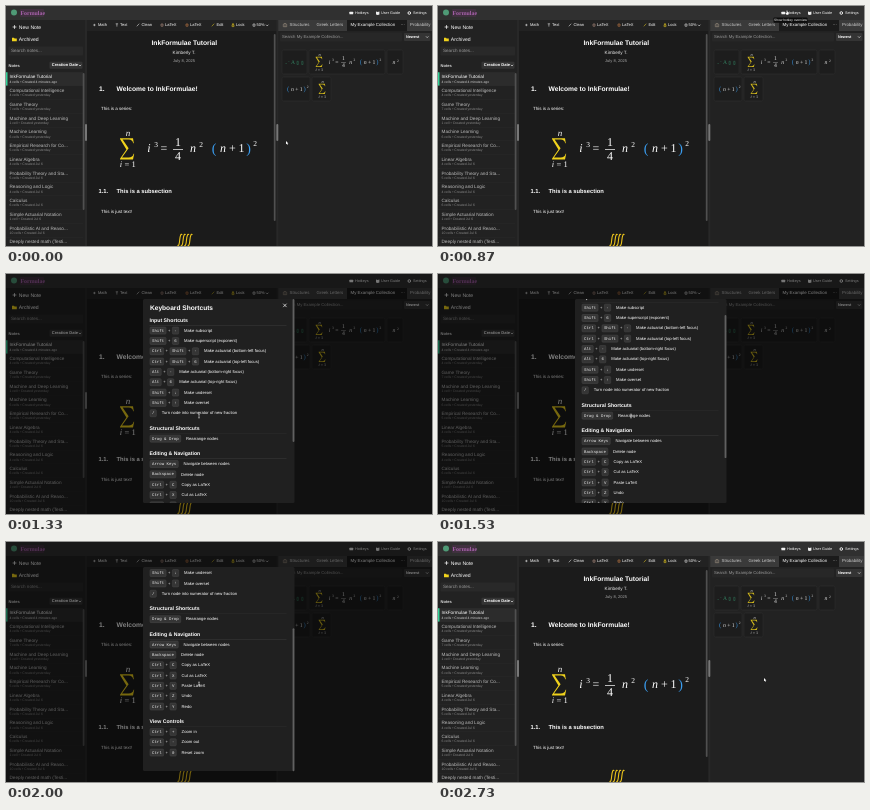
Animation, 426 px wide and 240 px high, one loop 2790 ms. Source, as an HTML page with a canvas:

```html
<!DOCTYPE html>
<html lang="en">
<head>
<meta charset="utf-8">
<title>InkFormulae</title>
<style>
html, body { margin: 0; width: 100%; height: 100%; overflow: hidden; background: #1b1b1b; }
canvas { display: block; width: 100vw; height: 100vh; }
</style>
</head>
<body>
<canvas id="stage"></canvas>
<script>
const W = 426, H = 240, LOOP = 2790;
const OPEN = 1000, CLOSE = 2520, MAX_SCROLL = 87.5;
const SANS = '"Liberation Sans", Arial, sans-serif';
const SERIF = '"Liberation Serif", serif';
const MONO = '"Liberation Mono", monospace';
const YELLOW = '#f0d21c', BLUE = '#3a9df0', GREEN = '#34d399';

const canvas = document.getElementById('stage');
const ctx = canvas.getContext('2d');
const ratio = window.devicePixelRatio || 1;
canvas.width = W * ratio;
canvas.height = H * ratio;

function rect(x, y, w, h, color, radius = 0) {
  ctx.fillStyle = color;
  ctx.beginPath();
  ctx.roundRect(x, y, w, h, radius);
  ctx.fill();
}

function frame(x, y, w, h, color, radius = 1) {
  ctx.strokeStyle = color;
  ctx.lineWidth = 0.5;
  ctx.beginPath();
  ctx.roundRect(x, y, w, h, radius);
  ctx.stroke();
}

function text(str, x, y, size, color = '#fff', { style = '', font = SANS, align = 'left' } = {}) {
  ctx.font = `${style} ${size}px ${font}`;
  ctx.textAlign = align;
  ctx.textBaseline = 'middle';
  ctx.fillStyle = color;
  ctx.fillText(str, x, y);
}

const bold = (str, x, y, size, color, align) => text(str, x, y, size, color, { style: 'bold', align });

function stroke(path, color, width = 0.6) {
  ctx.strokeStyle = color;
  ctx.lineWidth = width;
  ctx.stroke(new Path2D(path));
}

function fill(path, color) {
  ctx.fillStyle = color;
  ctx.fill(new Path2D(path));
}

function at(x, y, scale, draw) {
  ctx.save();
  ctx.translate(x, y);
  ctx.scale(scale, scale);
  draw();
  ctx.restore();
}

// Mathematics, laid out around the centre of the sum sign
const glyph = (str, x, y, size = 12, color = '#fff') =>
  text(str, x, y, size, color, { font: SERIF, align: 'center', style: /[a-z]/.test(str) ? 'italic' : '' });

function sum() {
  fill('M-7-10.8H6L6.8-5.8H6.2Q5.4-9.5 1.8-9.5H-4.4L1.6-.8L-5 8.6H1.6Q5.8 8.6 6.6 4.8H7.2L6 10.5H-7V9.8L-.6 .6L-7-10Z', YELLOW);
  glyph('n', 1, -15.6, 9);
  glyph('i', -6, 16, 8.5);
  glyph('=', 0, 16, 8.5);
  glyph('1', 6.5, 16, 8.5);
}

function square() {
  glyph('(', 0, 0, 14, BLUE);
  glyph('n', 9, 0);
  glyph('+', 18.5, 0);
  glyph('1', 27.5, 0);
  glyph(')', 34.5, 0, 14, BLUE);
  glyph('2', 41, -4.5, 7.5);
}

function nSquared() {
  glyph('n', 0, 0);
  glyph('2', 8, -4, 7.5);
}

function formula() {
  sum();
  glyph('i', 22, 0);
  glyph('3', 29, -4, 7.5);
  glyph('=', 37, 0);
  glyph('1', 51, -6.6);
  rect(46, 0.2, 10, 0.7, '#fff');
  glyph('4', 51, 7.6);
  at(66, 0, 1, nSquared);
  at(87, 0, 1, square);
}

function header() {
  rect(0, 0, W, 14, '#303030');
  ctx.fillStyle = '#4f9a76';
  ctx.beginPath();
  ctx.arc(8, 6.5, 3, 0, 7);
  ctx.fill();
  rect(14, 3, 24, 8, '#40303f', 1);
  text('Formulae', 14.5, 7, 5.9, '#a862ac', { font: SERIF, style: 'bold' });
  rect(343.4, 5.8, 3.8, 2.5, '#eee', 0.5);
  text('Hotkeys', 349, 7, 3.75);
  fill('M370 5.4L371.7 5.9L373.4 5.4V8.4L371.7 8.9L370 8.4Z', '#eee');
  text('User Guide', 375, 7, 3.75);
  ctx.strokeStyle = '#eee';
  ctx.lineWidth = 1;
  ctx.beginPath();
  ctx.arc(403.3, 7, 1.3, 0, 7);
  ctx.stroke();
  text('Settings', 407, 7, 3.75);
}

const notes = [
  ['InkFormulae Tutorial', '4 cells • Created 4 minutes ago'],
  ['Computational Intelligence', '4 cells • Created yesterday'],
  ['Game Theory', '7 cells • Created yesterday'],
  ['Machine and Deep Learning', '1 cell • Created yesterday'],
  ['Machine Learning', '6 cells • Created yesterday'],
  ['Empirical Research for Co...', '5 cells • Created yesterday'],
  ['Linear Algebra', '4 cells • Created Jul 6'],
  ['Probability Theory and Sta...', '5 cells • Created Jul 6'],
  ['Reasoning and Logic', '4 cells • Created Jul 6'],
  ['Calculus', '6 cells • Created Jul 6'],
  ['Simple Actuarial Notation', '1 cell • Created Jul 6'],
  ['Probabilistic AI and Reaso...', '10 cells • Created Jul 6'],
  ['Deeply nested math (Testi...', '']
];

function sidebar() {
  rect(0, 14, 80, 226, '#222');
  stroke('M6.6 21H10.4M8.5 19.1V22.9', '#fff', 0.7);
  text('New Note', 12.8, 21.2, 5.1);
  fill('M6 31.8H8L8.6 32.4H10.8V35.3H6Z', YELLOW);
  text('Archived', 12.8, 33.6, 5.1);
  rect(2.5, 40.5, 74.5, 9, '#292929', 1);
  text('Search notes...', 5, 45.2, 4.6, '#999');
  bold('Notes', 2.5, 59.5, 4.06, '#ddd');
  rect(43.5, 55.8, 33, 7, '#343434', 1);
  bold('Creation Date', 45.8, 59.3, 4.06);
  stroke('M72.8 58.8L74 60L75.2 58.8', '#fff');
  rect(0, 66.3, 77, 13.4, '#2c2c2c');
  rect(0, 66.3, 1.5, 13.4, GREEN);
  notes.forEach(([name, info], i) => {
    const y = 71.2 + i * 13.75;
    text(name, 3.5, y, 4.68, i ? '#bdbdbd' : '#fff');
    text(info, 3.5, y + 4.5, 3.45, i ? '#888' : '#ccc');
    rect(0, y + 8.6, 77, 0.3, '#2c2c2c');
  });
  rect(76.7, 67, 1.8, 137, '#505050', 0.9);
}

function splitter(x) {
  rect(x, 14, 2, 226, '#282828');
  rect(x, 118, 2, 17, '#777', 1);
}

const tools = [
  ['Math', 92, 'M87.2 19H89.6M88.4 17.8V20.2'], ['Text', 114, 'M109.7 17.8H112.1M110.9 17.8V20.6'],
  ['Clean', 135.5, 'M130.8 20.3L133.2 17.7'], ['LaTeX', 159, 'M155 18H157V20.2H155Z', '#c8a090'],
  ['LaTeX', 184, 'M180 18H182V20.2H180Z', '#e08a4b'], ['Edit', 210.5, 'M205.8 20.3L208.2 17.7', YELLOW],
  ['Lock', 230, 'M226 19H228V20.6H226ZM226.4 19V17.7H227.6V19', YELLOW], ['50%', 250.5, 'M247 18H249V20.2H247Z']
];

function editor() {
  rect(81, 14, 190, 226, '#1b1b1b');
  rect(81, 14, 190, 11, '#222');
  for (const [label, x, icon, color = '#fff'] of tools) {
    stroke(icon, color, 0.5);
    text(label, x, 19.2, 4.06);
  }
  stroke('M260 18.7L261.2 19.9L262.4 18.7', '#fff');
  bold('InkFormulae Tutorial', 178.3, 37.3, 6.7, '#fff', 'center');
  text('Kimberly T.', 178, 47, 4.65, '#eee', { align: 'center' });
  text('July 8, 2025', 178, 54.5, 4.06, '#aaa', { align: 'center' });
  bold('1.', 93, 82.7, 6.7);
  bold('Welcome to InkFormulae!', 110.5, 82.7, 6.7);
  text('This is a series:', 95, 103.2, 4.5);
  at(121, 143, 1, formula);
  bold('1.1.', 92.5, 185, 5.8);
  bold('This is a subsection', 110.5, 185, 5.8);
  text('This is just text!', 95, 205.5, 4.5);
  for (let i = 0; i < 4; i++) {
    const x = 171.5 + i * 3.4;
    stroke(`M${x} 239Q${x + 1.6} 241 ${x + 2.2} 234T${x + 4.8} 228.7`, '#ecc41c', 1.1);
  }
  rect(267.8, 28, 1.8, 187, '#505050', 0.9);
}

function collection() {
  rect(272, 14, 154, 226, '#222');
  rect(272, 14, 154, 11, '#3a3a3a');
  rect(341, 14, 60, 11, '#1b1b1b');
  stroke('M277.3 20.7V18.2L279 17.3L280.7 18.2V20.7ZM279 17.3V20.7', '#a99a88', 0.5);
  text('Structures', 283.5, 19, 4.4, '#ccc');
  text('Greek Letters', 310.5, 18.8, 4.4, '#ccc');
  text('My Example Collection', 344.5, 19, 4.4);
  text('⋯', 394.5, 19, 4.4, '#bbb');
  text('Probability', 404, 18.8, 4.4, '#ccc');
  rect(274, 26.5, 122, 9, '#272727', 1);
  text('Search My Example Collection...', 276, 31, 4.26, '#999');
  rect(398, 27, 26.5, 8, '#343434', 1);
  bold('Newest', 400, 31, 3.8);
  stroke('M420 30.4L421.2 31.6L422.4 30.4', '#fff');
  for (const [x, y, w] of [[276, 44, 25], [303, 44, 76], [381, 44, 16], [276, 71, 28], [306, 71, 19]]) {
    rect(x, y, w, 24, '#1d1d1d', 1.5);
    frame(x, y, w, 24, '#303030', 1.5);
  }
  ctx.globalAlpha = 0.85;
  stroke('M279.5 57.5H280.8M282.5 55.5H283.3M291 55.3H292.3V58.5H291ZM295.7 55.3H297V58.5H295.7Z', '#3a9a72', 0.4);
  glyph('A', 287, 56.5, 5.5, '#3a9a72');
  at(313, 56, 0.48, formula);
  at(388, 56.5, 0.48, nSquared);
  at(282, 83, 0.48, square);
  at(316, 83, 0.48, sum);
  ctx.globalAlpha = 1;
}

const sections = [
  ['Input Shortcuts', [
    ['Shift|-', 'Make subscript'], ['Shift|6', 'Make superscript (exponent)'],
    ['Ctrl|Shift|-', 'Make actuarial (bottom-left focus)'], ['Ctrl|Shift|6', 'Make actuarial (top-left focus)'],
    ['Alt|-', 'Make actuarial (bottom-right focus)'], ['Alt|6', 'Make actuarial (top-right focus)'],
    ['Shift|↓', 'Make underset'], ['Shift|↑', 'Make overset'],
    ['/', 'Turn node into numerator of new fraction']]],
  ['Structural Shortcuts', [['Drag & Drop', 'Rearrange nodes']]],
  ['Editing & Navigation', [
    ['Arrow Keys', 'Navigate between nodes'], ['Backspace', 'Delete node'],
    ['Ctrl|C', 'Copy as LaTeX'], ['Ctrl|X', 'Cut as LaTeX'], ['Ctrl|V', 'Paste LaTeX'],
    ['Ctrl|Z', 'Undo'], ['Ctrl|Y', 'Redo']]],
  ['View Controls', [['Ctrl|+', 'Zoom in'], ['Ctrl|-', 'Zoom out'], ['Ctrl|0', 'Reset zoom']]]
];

function shortcut(keys, label, y) {
  let x = 144;
  keys.split('|').forEach((key, i) => {
    if (i) {
      text('+', x + 3.15, y, 4.1, '#ddd', { align: 'center' });
      x += 6.3;
    }
    const width = key.length * 2.436 + 3.9;
    rect(x, y - 3.5, width, 7, '#353535', 1);
    frame(x, y - 3.5, width, 7, '#484848');
    text(key, x + 1.95, y, 4.06, '#eee', { font: MONO });
    x += width;
  });
  text(label, x + 5.3, y, 4.2);
}

function dialog(scroll) {
  rect(0, 0, W, H, 'rgba(0,0,0,.5)');
  rect(137, 25, 151.5, 204, '#202020', 1.5);
  ctx.save();
  ctx.beginPath();
  ctx.rect(137, 25, 151.5, 204);
  ctx.clip();
  ctx.translate(0, -scroll);
  bold('Keyboard Shortcuts', 144, 34.6, 6.6);
  stroke('M277.2 29.7L280.6 33.1M280.6 29.7L277.2 33.1', '#fff', 0.7);
  let y = 46.5;
  for (const [title, rows] of sections) {
    bold(title, 143.5, y, 5.2);
    rect(143.5, y + 4.6, 137, 0.4, '#3a3a3a');
    rows.forEach(([keys, label], i) => shortcut(keys, label, y + 10.1 + i * 10.33));
    y += 10.1 + (rows.length - 1) * 10.33 + 15.3;
  }
  ctx.restore();
  rect(286.6, 25 + scroll * 0.7, 1.8, 143, '#606060', 0.9);
}

// Pointer path: time, x, y
const path = [
  [0, 280, 136], [70, 280, 136], [600, 352, 8], [800, 349, 6], [1040, 349, 6],
  [1320, 193, 142], [2040, 193, 142], [2340, 326, 137], [LOOP, 326, 137]
];
const progress = (t, from, to) => Math.min(1, Math.max(0, (t - from) / (to - from)));
const smooth = p => p * p * (3 - 2 * p);

function pointer(t) {
  const i = path.findIndex(([time]) => time > t);
  const [t0, x0, y0] = path[i - 1], [t1, x1, y1] = path[i];
  const p = smooth(progress(t, t0, t1));
  at(x0 + (x1 - x0) * p, y0 + (y1 - y0) * p, 0.75, () => {
    if (t > 1300 && t < 2060) {
      stroke('M-1-2.5H1M0-2.5V2.5M-1 2.5H1', '#fff', 0.7);
    } else if (t > 560 && t < 1060) {
      fill('M-.5-2H.5V0L2.3.6V2.5L1.5 3.7H-.7L-2 1.6L-1.3 1L-.5 1.7Z', '#fff');
    } else {
      fill('M0-1.5V3L1 2.2L1.7 3.6L2.5 3.3L1.8 2H3.2Z', '#fff');
    }
  });
}

function draw(now) {
  const t = now % LOOP;
  ctx.setTransform(canvas.width / W, 0, 0, canvas.height / H, 0, 0);
  ctx.textRendering = 'geometricPrecision';
  sidebar();
  editor();
  collection();
  splitter(79);
  splitter(270.3);
  header();
  if (t >= 680 && t < OPEN) {
    rect(335.5, 11.5, 34, 5.2, '#0c0c0c', 0.8);
    text('Show hotkey overview', 352.5, 14.1, 3.3, '#fff', { align: 'center' });
  }
  if (t >= OPEN && t < CLOSE) dialog(MAX_SCROLL * progress(t, 1400, 1900));
  pointer(t);
}

const start = performance.now();
function tick() {
  draw(performance.now() - start);
  requestAnimationFrame(tick);
}
tick();
</script>
</body>
</html>
```
